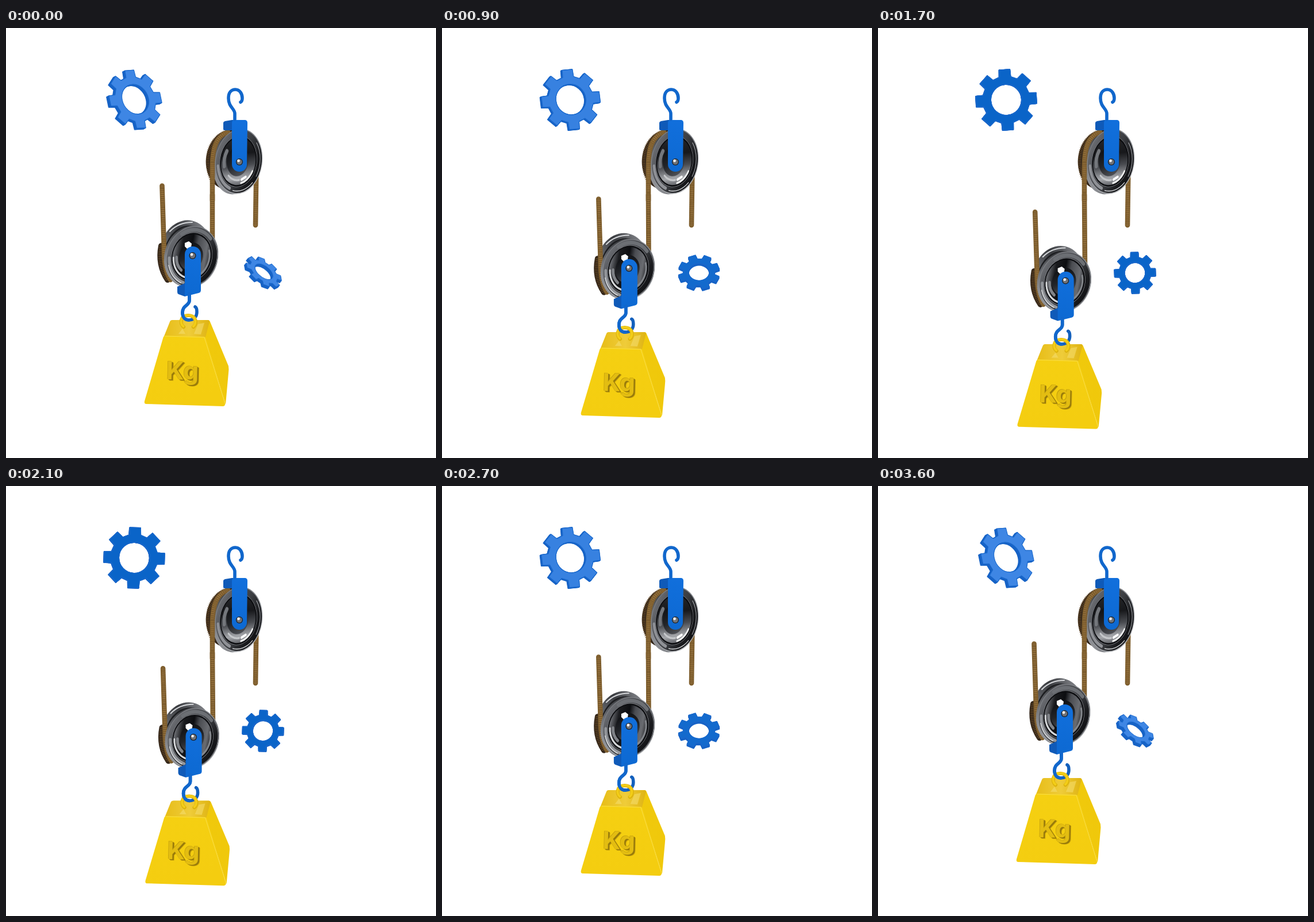
Write an HTML page that moves like this. It is 748 px wide and 748 px high and loops after 3.7 s.

```html
<!DOCTYPE html>
<html>
<head>
<meta charset="utf-8">
<style>
html, body { margin: 0; width: 100%; height: 100%; overflow: hidden; background: #fff }
svg { display: block; width: 100vw; height: 100vh }
text { font: 700 43px Inter, Arial, sans-serif }
</style>
</head>
<body>
<svg id="stage" viewBox="0 0 748 748" fill="none" stroke-linecap="round" stroke-linejoin="round"></svg>
<script>
const rad = Math.PI / 180;

const gradient = (id, dir, ...stops) => `<linearGradient id="${id}" ${dir}>` +
  stops.map(([at, color]) => `<stop offset="${at}" stop-color="${color}"/>`).join('') + '</linearGradient>';
const path = (d, fill, more = '') => `<path d="${d}" fill="${fill}" ${more}/>`;
const line = (d, color, width) => `<path d="${d}" stroke="${color}" stroke-width="${width}"/>`;
const dashes = (d, color, width, pattern) =>
  `<path d="${d}" stroke="${color}" stroke-width="${width}" stroke-dasharray="${pattern}" stroke-linecap="butt"/>`;

function arc(r, from, to, color, width, dx = 0) {
  const p = a => `${dx + r * Math.cos(a * rad)} ${r * Math.sin(a * rad)}`;
  return line(`M${p(from)}A${r} ${r} 0 ${to - from > 180 ? 1 : 0} 1 ${p(to)}`, color, width);
}

// Speckled cord: a solid stroke with two broken overlays
const rope = (d, id = '') => `<g ${id}>` + line(d, '#80602f', 8.6) +
  dashes(d, '#a07a45', 5, '1 2.3') + dashes(d, '#6c4f28', 7.5, '.6 3.1') + '</g>';

const ellipse = (cx, cy, rx, ry, turn, fill) =>
  `<ellipse rx="${rx}" ry="${ry}" transform="translate(${cx} ${cy}) rotate(${turn})" fill="${fill}"/>`;

// Polished wheel, drawn in a circle of radius 50 and squashed into place
function wheel(cx, cy, rx, ry, turn, dish, shine) {
  const layers = [[50, 'url(#edge)'], [48.5, 'url(#rim)'], [39.5, '#85878c'], [38.8, '#0c0d10'],
    [36.5, `url(#${dish})`], [23, 'url(#hub)']];
  const rings = layers.map(([r, fill]) => `<circle cx="${(r - 50) * .09}" r="${r}" fill="${fill}"/>`).join('');
  return `<g transform="translate(${cx} ${cy}) rotate(${turn}) scale(${rx / 50} ${ry / 50})">${rings}${shine}</g>`;
}

const axle = (x, y) => `<circle cx="${x}" cy="${y}" r="6" fill="#1c1d20"/>` +
  `<circle cx="${x}" cy="${y}" r="4.8" fill="#707378"/>` +
  `<circle cx="${x - 1.5}" cy="${y - 2}" r="2.4" fill="#f2f2f2"/>`;

const defs = '<defs>' +
  gradient('edge', 'x1="0" y1=".2" x2=".7" y2="1"', [0, '#77797e'], [.5, '#8d9095'], [1, '#b5b7ba']) +
  gradient('rim', 'x1="0" y1=".3" x2="1" y2=".7"', [0, '#6d6f74'], [.25, '#505257'], [.55, '#3b3d41'], [.8, '#1a1b1e'], [1, '#101114']) +
  gradient('dishUp', 'x1=".4" y1="0" x2=".6" y2="1"', [0, '#26272a'], [.35, '#17181b'], [.6, '#4a4c51'], [.85, '#a5a7ab'], [1, '#606267']) +
  gradient('dishLow', 'x1="0" y1=".5" x2="1" y2=".4"', [0, '#6e7075'], [.2, '#1a1b1e'], [.45, '#0c0d10'], [.6, '#4a4c51'], [.85, '#6a6c71'], [1, '#26272a']) +
  gradient('hub', 'x1=".2" y1="0" x2=".8" y2="1"', [0, '#0d0e11'], [.5, '#222428'], [1, '#55575c']) +
  gradient('back', 'x1="0" y1="1" x2=".8" y2="0"', [0, '#b4b6ba'], [.35, '#6a6c71'], [.65, '#3a3c40'], [1, '#8a8c91']) +
  gradient('strap', 'x1="0" y1="0" x2="0" y2="1"', [0, '#116fdc'], [1, '#0d69d2']) +
  gradient('front', 'x1="0" y1="0" x2=".3" y2="1"', [0, '#f5d012'], [1, '#f4cd10']) +
  gradient('side', 'x1="0" y1="0" x2="1" y2="0"', [0, '#efca0e'], [1, '#f0c80b']) +
  gradient('top', 'x1="0" y1="0" x2="1" y2="0"', [0, '#e7bd18'], [.55, '#efcc3a'], [1, '#dfb413']) +
  '</defs>';

const upperGroove = 'M383 180C360 189 348 211 351 241C353 255 356 264 361 271';
const upper =
  rope('M435.500 240L434 343') +
  ellipse(388, 229, 40, 52, 8, '#33261a') +
  dashes(upperGroove, '#6a4b25', 6, '1 2') +
  ellipse(398.500, 233.500, 39, 56, 8, 'url(#back)') +
  rope('M386 181C366 188 359 208 359 240V300') +
  wheel(405, 232, 41, 57, 8, 'dishUp',
    arc(44, 105, 165, '#8f9196', 5) + arc(45.500, 40, 95, '#c9cbce', 1.500) +
    arc(34.500, 20, 70, '#eceded', 3, -1) + arc(45, -45, 25, '#a5a8ac', 1.200) +
    arc(30, 160, 205, '#74777c', 7, -1) + arc(29, 75, 125, '#c5c7ca', 3, -1) +
    line('M11 27L19 22', '#fff', 4)) +
  path('M378 165Q378 163 381 162L393 160H416L419 164L394 167V178H380Q378 178 378 176Z', '#0f5ab8') +
  path('M393 165Q393 160 398 160H415Q420 160 420 165L419 237A13 13 0 0 1 393 237Z', 'url(#strap)') +
  axle(406, 233) +
  line('M398 159V149C398 140 387 138 387 122C387 112 392 107 399 107C407 107 411 115 411 122C411 126 410 128 408 129', '#1167cc', 5.600);

const hookLeft = 'M319 463V474C319 483 307 482 307 495C307 503 311 508 318 508';
const hook = hookLeft + 'C327 508 332 502 332 494C332 489 331 486 329 485';

function label() {
  const word = (d, fill) => `<text x="${278.500 + d}" y="${611 + d * .7}" fill="${fill}" transform="rotate(1.200 279 611)">Kg</text>`;
  return word(3.500, '#d0a90c') + word(2.500, '#94770c') + word(1.300, '#9c7f0c') +
    word(-.8, '#c39f0e') + word(0, '#e3bd12');
}

const weight =
  path('M289 508H351Q354 508 355 511L387 588Q388 594 387 600L382 655L346 537Z', 'url(#side)') +
  path('M289 508H351Q354 508 354 511L347 538L275 536L285 511Q286 508 289 508Z', 'url(#top)') +
  path('M300 532L307 523L312 532ZM327 532L334 515L345 513L339 533Z', '#f6dd6b', 'opacity=".6"') +
  path('M278 535L344 537Q347 537 348 540L381 652Q382 658 377 658L244 654Q240 654 241 649L273 540Q274 535 278 535Z', 'url(#front)') +
  line('M277 536L345 538L381 653', '#f9de4a', 1) +
  label();

const lowerGroove = 'M270 379C266 400 269 420 281 438';
const lower =
  ellipse(312.500, 388, 44.500, 54, 12, 'url(#back)') +
  ellipse(315, 393, 40, 50, 12, '#1d1e21') +
  line('M285 354Q300 338 324 338', '#d5d7da', 2) +
  line(lowerGroove, '#33261a', 10) +
  dashes(lowerGroove, '#6a4b25', 7, '1 2') +
  rope('M271.500 274.500L275 385C275 405 278 425 286 438') +
  ellipse(320, 397.500, 44.500, 54, 15, 'url(#back)') +
  wheel(324, 398, 45, 54, 15, 'dishLow',
    arc(44, -135, -55, '#6c6f74', 6) + arc(44, 95, 165, '#93969b', 5) +
    arc(46, 100, 150, '#dcdee0', 1.500) + arc(35, 95, 165, '#d6d8da', 3, -1) +
    arc(34, -30, 45, '#85888d', 3, -1) + arc(28, 115, 165, '#808388', 5, -2) +
    arc(47.500, -50, 80, '#7b7d82', 1)) +
  path('M298 450L311 444L316 458L311 467L300 463Q298 462 298 459Z', '#0f5ab8') +
  path('M311 374L318 371L323 375L322 381L315 384L311 380Z', '#fff') +
  path('M311 394A14 14 0 0 1 339 394V456Q339 460 335 461L311 467Z', 'url(#strap)') +
  axle(324.500, 396) +
  weight +
  line(hook, '#1360bd', 5.600) +
  line('M309 520C302 515 303 500 317 500C331 500 333 515 326 520', '#dcb20c', 6.200) +
  line('M308.500 519C302 514 303 499.500 317 499.500C331 499.500 332 514 326 519', '#f3cd17', 4) +
  line(hookLeft, '#1167cc', 5.600);

function gearPath(r) {
  const points = [];
  for (let i = 0; i < 8; i++) {
    for (const [turn, k] of [[-14, .755], [-10, .985], [10, .985], [14, .755]]) {
      const a = (i * 45 + turn - 90) * rad;
      points.push(`${r * k * Math.cos(a)} ${r * k * Math.sin(a)}`);
    }
  }
  const h = r * .5;
  return `M${points.join('L')}ZM${h} 0A${h} ${h} 0 1 0 ${-h} 0A${h} ${h} 0 1 0 ${h} 0Z`;
}

const gear = (id, r) => `<g id="${id}">` +
  path(gearPath(r), '#1763c6', 'fill-rule="evenodd" stroke="#1763c6" stroke-width="1.6"').repeat(6) +
  path(gearPath(r), '#0a64c8', 'fill-rule="evenodd" stroke="#1a69cd" stroke-width="1.2"') + '</g>';

stage.innerHTML = defs + gear('big', 54) + gear('small', 36.500) + upper +
  rope('M359 290V375', 'id="strand"') + `<g id="load">${lower}</g>`;

const mix = (a, b, k) => a.map((v, i) => Math.round(v + (b[i] - v) * k));
const clamp = k => Math.min(1, Math.max(0, k));

function poseGear(node, x, y, axis, tilt, spin, depth, shade) {
  const squash = Math.cos(tilt * rad), shift = depth * Math.sin(tilt * rad) + .8;
  const sx = -Math.sin(axis * rad) * shift, sy = Math.cos(axis * rad) * shift;
  const last = node.children.length - 1;
  [...node.children].forEach((layer, i) => {
    const k = .5 - i / last;
    layer.setAttribute('transform', `translate(${x + sx * k} ${y + sy * k}) rotate(${axis}) scale(1 ${squash}) rotate(${spin - axis})`);
  });
  node.lastChild.setAttribute('fill', `rgb(${mix([62, 134, 228], [10, 100, 200], clamp(shade))})`);
}

function draw(now) {
  const t = Math.floor(now % 3700 / 100) * 100;
  const u = (1 - Math.cos(Math.PI * t / 1800)) / 2;
  load.setAttribute('transform', `matrix(1 0 0 ${1 - .0155 * u} ${1.7 * u} ${50.1 * u})`);
  for (const p of strand.children) p.setAttribute('d', `M359 290L${359 + u} ${372 + 44 * u}`);
  poseGear(big, 223, 125, 60, 35 * (1 - u), -8 - 86 * u, 7, (u - .45) / .37);
  poseGear(small, 447, 426, 38 - 76 * u, 58 * (1 - u ** 1.3), 7 - 54 * u, 5.5, u / .6);
}

const start = performance.now();
function tick() {
  draw(performance.now() - start);
  requestAnimationFrame(tick);
}
tick();
</script>
</body>
</html>
```
